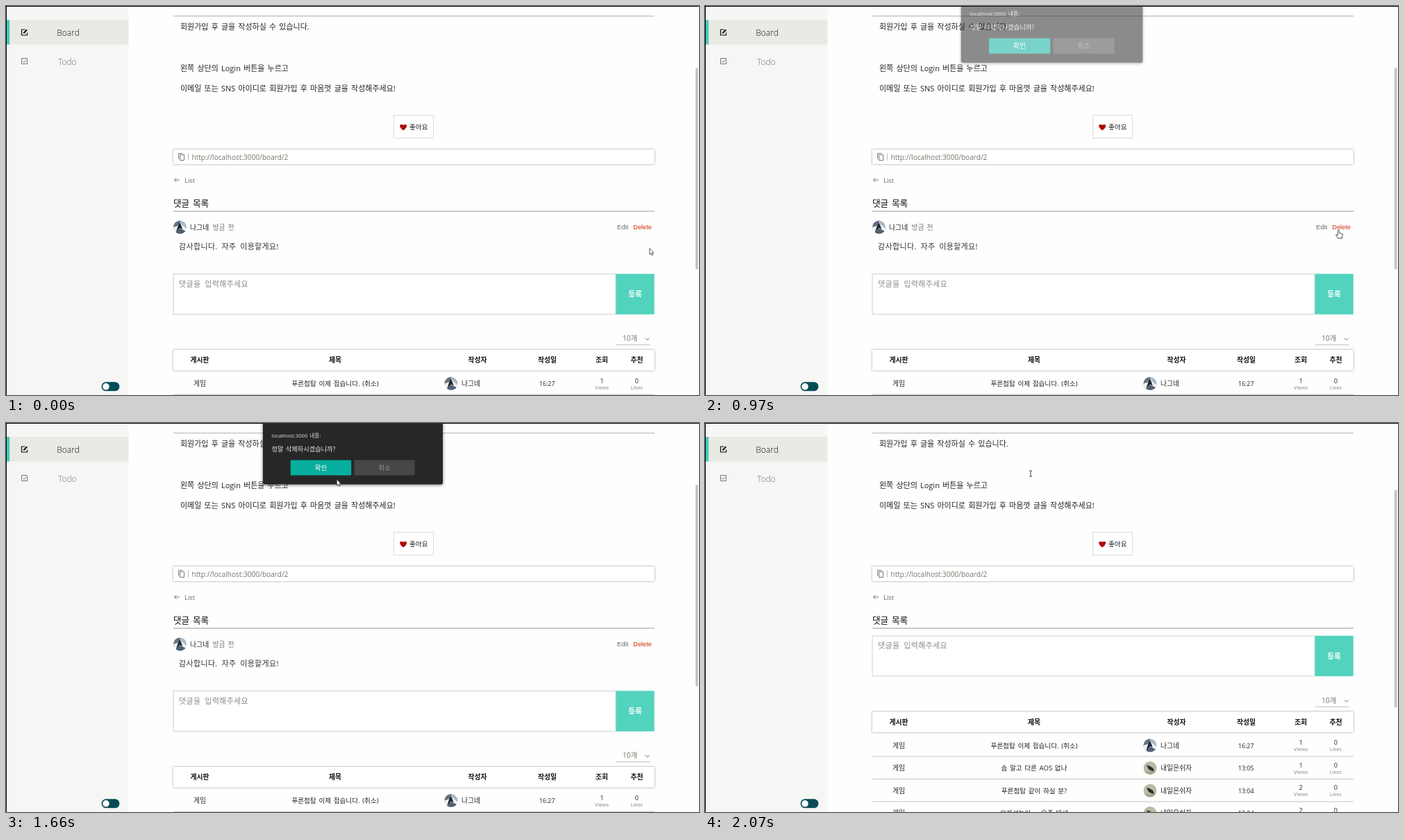
An HTML page for the animation above (3050 ms loop, 998 by 561 pixels).

```html
<!DOCTYPE html>
<html lang="ko">
<head>
<meta charset="utf-8">
<title>Board</title>
<style>
  html, body { margin: 0; width: 100%; height: 100%; overflow: hidden; background: #fff; }
  svg { display: block; width: 998px; height: 561px; }
  text {
    font-family: 'Open Sans', 'Noto Sans CJK KR', 'Noto Sans CJK', sans-serif;
    white-space: pre; word-spacing: .12em;
  }
  .arial { font-family: 'Liberation Sans', Arial, sans-serif; }
  .mono { letter-spacing: .35px; word-spacing: 2.6px; }
  .soft { filter: drop-shadow(0 0 1.5px rgba(0, 0, 0, .42)); }
  #ibeam { mix-blend-mode: difference; }
</style>
</head>
<body>
<svg id="stage" viewBox="0 0 998 561">
  <defs>
    <clipPath id="disc"><circle r="9.6"/></clipPath>
    <g id="peak" clip-path="url(#disc)">
      <circle r="9.6" fill="#a9b9c6"/>
      <path d="M-10-10H1L-5 1L-10 3Z" fill="#66727e"/>
      <path d="M-10 0L-3-2L-5 7L-8 8Z" fill="#eef1f3"/>
      <path d="M-1-7L6 4L0 1L-6 8Z" fill="#1f2530"/>
      <path d="M1-5L9 2V6L4 4Z" fill="#f3f5f6"/>
      <path d="M-6 8L0 2L9 6V10H-6Z" fill="#4f6174"/>
    </g>
    <g id="field" clip-path="url(#disc)">
      <circle r="9.6" fill="#b9b9a4"/>
      <path d="M-5-4L-1-3L4 0L6 5L2 4L-2 2Z" fill="#2b2a26"/>
      <path d="M-9 5H9V10H-9Z" fill="#a5a58f"/>
    </g>
  </defs>
  <g id="page"></g>
  <g id="comment"></g>
  <g id="lower"></g>
  <rect id="thumb" x="993" width="3.6" rx="1.8" fill="#c3c3c3"/>
  <path d="M0 .5H998M.5 0V561" stroke="#000"/>
  <g id="dialog"></g>
  <g id="arrow" fill="#fff" stroke="#333" stroke-width=".8" stroke-linejoin="round">
    <path d="M.4 .4V9.4L2.4 7.5L3.8 10.7L5.2 10.1L3.9 7H6.5Z"/>
  </g>
  <g id="hand" fill="#fff" stroke="#333" stroke-width=".9" stroke-linejoin="round">
    <path d="M-1.2 1.4a1.2 1.2 0 0 1 2.4 0V4.6L4.6 5.3Q5.8 5.7 5.6 7L4.8 12H-.6L-3.7 8Q-4.2 6.5 -2.9 6.5L-1.2 7.7Z"/>
  </g>
  <path id="ibeam" d="M-2-4H2M0-4V4M-2 4H2" fill="none" stroke="#bbb"/>
</svg>
<script>
const $ = id => document.getElementById(id);

// Text placed by its vertical middle.
const text = (x, mid, str, size, fill = '#222', opt = {}) =>
  `<text x="${x}" y="${mid + size * .37}" font-size="${size}" fill="${fill}"
    font-weight="${opt.weight || 400}" text-anchor="${opt.anchor || 'start'}" class="${opt.cls || ''}">${str}</text>`;
const center = (x, mid, str, size, fill, weight) => text(x, mid, str, size, fill, { anchor: 'middle', weight });
const rect = (x, y, w, h, fill, more = '') =>
  `<rect x="${x}" y="${y}" width="${w}" height="${h}" fill="${fill}" ${more}/>`;
const stroke = (d, color, width = 1) => `<path d="${d}" fill="none" stroke="${color}" stroke-width="${width}"/>`;
const avatar = (kind, x, y) => `<use href="#${kind}" x="${x}" y="${y}"/>`;
const panel = (y, h) => rect(241, y, 692.8, h, '#fff', 'class="soft"');

const USER = '나그네', OTHER = '내일은쉬자';
const TEAL = '#52d3be';

$('page').innerHTML =
  rect(0, 0, 998, 561, '#fefefe') +
  rect(1, 1, 175.5, 560, '#f6f6f4') +
  rect(1, 20, 175.5, 35.5, '#e9eae4') +
  rect(1, 20, 4.2, 35.5, '#3fceb6') +
  stroke('M27.5 34H22.5V42H30.5V38.5', '#111', 1.2) +
  stroke('M25.3 39.2L30.2 34.3', '#111', 2) +
  text(73.3, 38.2, 'Board', 12, '#151515', { weight: 300 }) +
  stroke('M22.5 75.5H30.5V83.5H22.5ZM24.3 79.5L26 81.2L29 77.7', '#777') +
  text(75, 80.2, 'Todo', 12, '#777', { weight: 300 }) +
  rect(137.5, 542.3, 26, 13, '#064c57', 'rx="6.5"') +
  '<circle cx="144" cy="548.8" r="4.8" fill="#fff"/>' +
  stroke('M241 14.5H934', '#b4b4b4') +
  text(251, 30, '회원가입 후 글을 작성하실 수 있습니다.', 11) +
  text(251, 89.5, '왼쪽 상단의 <tspan font-weight="500">Login</tspan> 버튼을 누르고', 11) +
  text(251, 119, '이메일 또는 SNS 아이디로 회원가입 후 마음껏 글을 작성해주세요!', 11) +
  rect(558.5, 157.5, 57, 33, '#fff', 'stroke="#dcdcdc"') +
  '<path d="M572.2 179.4C564 174 567.5 168.4 572.2 171.8C577 168.4 580.4 174 572.2 179.4Z" fill="#b00808"/>' +
  text(581, 174.5, '좋아요', 9.6) +
  panel(207, 21) +
  stroke('M250.5 214.5H256.5V222.5H250.5ZM248.5 220.5V212.5H254.5', '#777') +
  stroke('M262.5 212.5V222.5', '#bbb') +
  text(267.5, 218, 'http://localhost:3000/board/2', 10.1, '#76766c') +
  stroke('M250 251H242.5M245.5 248L242.5 251L245.5 254', '#777') +
  text(257, 251.5, 'List', 9.5, '#666') +
  text(241, 284.5, '댓글 목록', 12.6, '#111') +
  stroke('M241 296H934', '#b8b8b8', 1.5);

$('comment').innerHTML =
  avatar('peak', 250.6, 319) +
  text(265, 319, USER, 9.9) +
  text(297.5, 319, '방금 전', 9.9, '#777') +
  text(880, 318.5, 'Edit', 9.3, '#666', { cls: 'arial' }) +
  text(903.3, 318.5, 'Delete', 9.2, '#d02f10', { cls: 'arial' }) +
  text(249, 346.5, '감사합니다. 자주 이용할게요!', 11, '#333', { cls: 'mono' });

const row = ([title, user, pic, time, views], i) => {
  const y = 544.5 + i * 32.5;
  return center(279, y, '게임', 9.8) + center(474, y, title, 9.6) +
    avatar(pic, 641, y) + text(656, y, user, 9.8) +
    center(779.2, y + .5, time, 8.8) +
    center(858, y - 4, views, 9) + center(858, y + 5.6, 'Views', 7.8, '#888') +
    center(908.3, y - 4, '0', 9) + center(908.3, y + 5.6, 'Likes', 7.4, '#888') +
    stroke(`M241 ${y + 16}H934`, '#c4c4c4');
};
const heads = [[279, '게시판'], [474, '제목'], [679, '작성자'], [779.5, '작성일'], [858, '조회'], [908.5, '추천']];
const posts = [
  ['푸른첨탑 이제 접습니다. (취소)', USER, 'peak', '16:27', 1],
  ['솜 말고 다른 AOS 없나', OTHER, 'field', '13:05', 1],
  ['푸른첨탑 같이 하실 분?', OTHER, 'field', '13:04', 2],
  ['모래성놀이 ... 요즘 대세', OTHER, 'field', '13:04', 2]
];
$('lower').innerHTML =
  rect(241, 386.5, 637, 58, '#fff', 'stroke="#d0d0d0"') +
  text(249, 400.5, '댓글을 입력해주세요', 11, '#8a8a8a', { cls: 'mono' }) +
  rect(878.4, 386.3, 55.3, 58.4, TEAL) +
  center(906, 415.5, '등록', 10.7, '#fff', 700) +
  text(888, 479.5, '10개', 10.2, '#76766c') +
  stroke('M921 479L923.7 481.7L926.4 479', '#666') +
  stroke('M879 488.7H927.5', '#bbb') +
  panel(496, 29.5) +
  heads.map(([x, label]) => center(x, 510.5, label, 9.8, '#111', 700)).join('') +
  posts.map(row).join('');

$('dialog').innerHTML =
  rect(370, -12, 259, 100.5, '#272727', 'rx="2.5" style="filter:drop-shadow(0 1px 2px rgba(0,0,0,.55))"') +
  text(382.5, 18, 'localhost:3000 내용:', 7.7, '#e2e2e2') +
  text(382.5, 37.5, '정말 삭제하시겠습니까?', 9.2, '#e8e8e8') +
  rect(409.8, 53.5, 87.4, 22, '#07ae9e', 'id="ok" rx="1"') +
  center(453.5, 64.3, '확인', 9.6, '#fff', 500) +
  rect(501.5, 53.5, 87.2, 22, '#474747', 'rx="1"') +
  center(545, 64.3, '취소', 9.6, '#929292');

const LOOP = 3050;
const OPEN = [912, 1100], PRESS = 1850, CLOSE = [1925, 2068], REMOVED = 1942;
const COMMENT_HEIGHT = 79.5;

const ease = {
  in: p => p * p,
  out: p => Math.sin(p * Math.PI / 2),
  both: p => (1 - Math.cos(p * Math.PI)) / 2
};
// time, x, y, easing towards this point
const path = [
  [0, 926.5, 349, 'both'], [80, 926.5, 349, 'both'], [450, 912.2, 327, 'both'],
  [540, 913, 325, 'both'], [640, 912.5, 323, 'both'], [1060, 912.5, 323, 'both'],
  [1150, 870, 316, 'in'], [1690, 474.5, 80, 'out'], [1720, 474.5, 80, 'both'],
  [1840, 469, 73, 'both'], [LOOP, 469, 73, 'both']
];
const shapes = [[0, 'arrow'], [620, 'hand'], [1590, 'arrow'], [1935, 'ibeam']];

const span = (t, [a, b]) => Math.min(1, Math.max(0, (t - a) / (b - a)));
const show = (id, on) => $(id).setAttribute('visibility', on ? 'visible' : 'hidden');

function pointer(t) {
  const i = path.findIndex(k => k[0] > t);
  const [t0, x0, y0] = path[i - 1], [t1, x1, y1, mode] = path[i];
  const p = ease[mode]((t - t0) / (t1 - t0));
  return [x0 + (x1 - x0) * p, y0 + (y1 - y0) * p];
}

function draw(t) {
  const removed = t >= REMOVED;
  show('comment', !removed);
  $('lower').setAttribute('transform', `translate(0 ${removed ? -COMMENT_HEIGHT : 0})`);
  $('thumb').setAttribute('y', removed ? 96.5 : 89);
  $('thumb').setAttribute('height', removed ? 314 : 291);

  const opened = 1 - (1 - span(t, OPEN)) ** 2, closed = span(t, CLOSE);
  const lift = 16 * (1 - opened) + 10 * (1 - (1 - closed) ** 2.7);
  show('dialog', opened > 0 && closed < 1);
  $('dialog').setAttribute('opacity', opened * (1 - closed ** 1.35));
  $('dialog').setAttribute('transform',
    `translate(499.5 ${-lift}) scale(${1 + lift * .0013}) translate(-499.5 0)`);
  $('ok').setAttribute('fill', t < PRESS ? '#07ae9e' : '#177464');

  const [x, y] = pointer(t);
  const current = shapes.filter(s => s[0] <= t).pop()[1];
  for (const id of ['arrow', 'hand', 'ibeam']) {
    show(id, id === current);
    $(id).setAttribute('transform', `translate(${x} ${y})`);
  }
}

const start = performance.now();
function tick() {
  draw((performance.now() - start) % LOOP);
  requestAnimationFrame(tick);
}
tick();
</script>
</body>
</html>
```
